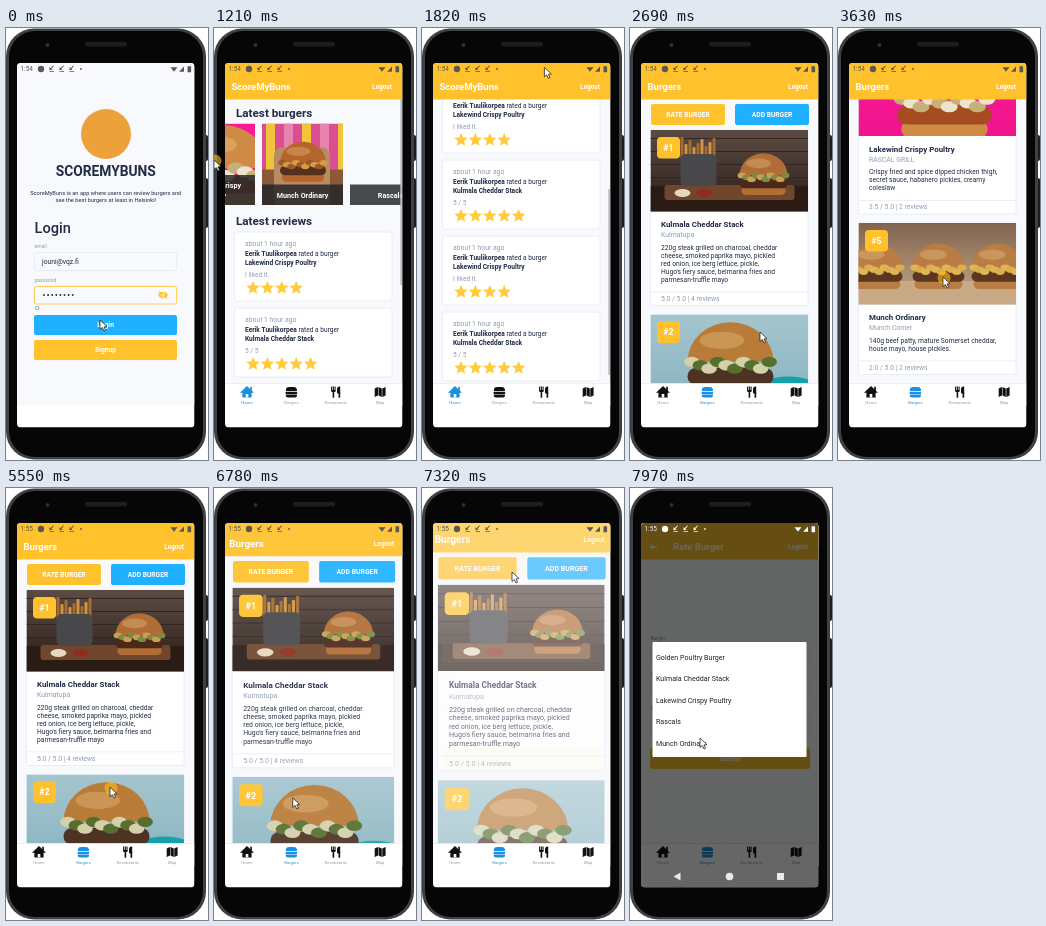
Recreate the animation shown at these times as an HTML page with a canvas. Size 202x432 px, loop 8 s.

```html
<!DOCTYPE html>
<html lang="en">
<head>
<meta charset="utf-8">
<title>Burger app demo</title>
<style>
html, body { margin: 0; width: 100%; height: 100%; overflow: hidden; background: #fff; }
canvas { display: block; width: 100vw; height: 100vh; }
</style>
</head>
<body>
<canvas id="stage"></canvas>
<script>
const W = 202, H = 432, LOOP = 8000;
const canvas = document.getElementById('stage');
const c = canvas.getContext('2d');

const YELLOW = '#ffc22d', BLUE = '#1fb1ff', ACTIVE = '#1a8fe3';
const INK = '#222b45', GRAY = '#8f9bb3', PAGE = '#f7f9fc', LINE = '#e4e9f2';
const APP = 'ScoreMyBuns';
const SCREEN = { x: 11, y: 35, w: 177.5, h: 364.5 };
const BODY = { ...SCREEN, h: 320.5 };
const MID = SCREEN.x + SCREEN.w / 2;
const PHOTO_W = 157.5, PHOTO_H = 81.5;

const burgers = [
  { name: 'Kulmala Cheddar Stack', place: 'Kulmatupa', score: '5.0 / 5.0 | 4 reviews', text: [
    '220g steak grilled on charcoal, cheddar', 'cheese, smoked paprika mayo, pickled',
    'red onion, ice berg lettuce, pickle,', 'Hugo\'s fiery sauce, belmarina fries and', 'parmesan-truffle mayo'] },
  { name: 'Rascals', place: 'RASCAL GRILL', score: '4.5 / 5.0 | 2 reviews', text: [
    '140g beef patty, cheddar cheese, creamy', 'coleslaw, iceberg lettuce, pickled red',
    'onion, house pickles, smoked paprika', 'mayo'] },
  { name: 'Golden Poultry Burger', place: 'Kulmatupa', score: '4.0 / 5.0 | 1 reviews', text: [
    'Crispy chicken breast, cheddar cheese,', 'smoked paprika mayo, Hugo\'s fiery sauce,',
    'pickled red onion, iceberg lettuce, pickle,', 'belmarina fries & parmesan-truffle mayo'] },
  { name: 'Lakewind Crispy Poultry', place: 'RASCAL GRILL', score: '3.5 / 5.0 | 2 reviews', text: [
    'Crispy fried and spice dipped chicken thigh,', 'secret sauce, habanero pickles, creamy', 'coleslaw'] },
  { name: 'Munch Ordinary', place: 'Munch Corner', score: '2.0 / 5.0 | 2 reviews', text: [
    '140g beef patty, mature Somerset cheddar,', 'house mayo, house pickles.'] }
];

// --- timing: every pointer move lasts STEP, drags also scroll ---
const STEP = 250, FADE = 240;
const LOADING = 390, LOADED = 550, TO_BURGERS = 2020, PICK = 7750;
const START = [94, 292], TAB = [76, 365];
const visits = [
  { from: 4180, to: 4690, draw: () => detail(2) },
  { from: 5780, to: 6605, draw: () => detail(0) },
  { from: 7180, to: LOOP * 2, draw: () => form() }
];
const moves = [];

function move(start, to, drag) {
  const from = moves.length ? moves[moves.length - 1].to : START;
  moves.push({ start, from, to, drag });
}
move(LOADED, [150, 132]);
move(960, [0, 132], 'slides');
move(1220, [130, 300]);
move(1500, [128, 0], 'home');
move(1770, TAB);
move(2440, [130, 304]);
move(2700, [122, 0], 'list');
move(3150, [105, 249]);
move(3640, [105, 150]);
move(3890, [108, 270], 'list');
move(4450, TAB);
move(4950, [100, 90]);
move(5310, [104, 300], 'list');
move(6150, TAB);
move(6710, [90, 84]);
move(7440, [75, 163]);
move(7720, [70, 250]);

const clamp = (v, lo = 0, hi = 1) => Math.max(lo, Math.min(hi, v));
const ramp = (t, start, span) => clamp((t - start) / span);
const ease = k => k * k * (3 - 2 * k);

function place(m, t) {
  const k = ease(ramp(t, m.start, STEP));
  return m.from.map((v, i) => v + (m.to[i] - v) * k);
}

function scrolled(kind, axis, t, gain = 1, max = 300) {
  return moves.filter(m => m.drag === kind)
    .reduce((v, m) => clamp(v + (m.from[axis] - place(m, t)[axis]) * gain, 0, max), 0);
}

// The finger is down while dragging and just before it leaves a spot.
function isPressed(t) {
  return moves.some((m, i) => m.drag
    ? t >= m.start && t <= m.start + STEP
    : i > 0 && t >= m.start - 80 && t < m.start);
}

// --- drawing helpers ---
function rect(x, y, w, h, fill, r = 0, stroke) {
  c.beginPath();
  c.roundRect(x, y, w, h, r);
  if (fill) { c.fillStyle = fill; c.fill(); }
  if (stroke) { c.strokeStyle = stroke; c.lineWidth = 0.8; c.stroke(); }
}

const area = (a, fill) => rect(a.x, a.y, a.w, a.h, fill);

function text(s, x, y, size, color = INK, weight = 400, align = 'left') {
  c.font = `${weight} ${size}px Roboto, sans-serif`;
  c.textAlign = align;
  c.textBaseline = 'middle';
  c.fillStyle = color;
  c.fillText(s, x, y + size * 0.06);
  return c.measureText(s).width;
}

function oval(x, y, rx, ry, fill, from = 0, to = Math.PI * 2) {
  c.beginPath();
  c.ellipse(x, y, rx, ry, 0, from, to);
  c.fillStyle = fill;
  c.fill();
}

function poly(points, fill, stroke, width = 1) {
  c.beginPath();
  points.forEach(p => c.lineTo(p[0], p[1]));
  c.closePath();
  if (fill) { c.fillStyle = fill; c.fill(); }
  if (stroke) { c.strokeStyle = stroke; c.lineWidth = width; c.stroke(); }
}

function repeat(n, draw) {
  for (let i = 0; i < n; i++) draw(i);
}

function clip(a, draw, r = 0) {
  c.save();
  c.beginPath();
  c.roundRect(a.x, a.y, a.w, a.h, r);
  c.clip();
  draw();
  c.restore();
}

function star(x, y, r) {
  const pts = Array.from({ length: 10 }, (_, i) => {
    const a = (i / 5 - 0.5) * Math.PI, q = i % 2 ? r * 0.45 : r;
    return [x + q * Math.cos(a), y + q * Math.sin(a)];
  });
  poly(pts, '#ffcb3d');
}

// --- photos, simplified to flat shapes ---
function backdrop(top, bottom) {
  const g = c.createLinearGradient(0, 0, 0, PHOTO_H);
  g.addColorStop(0, top);
  g.addColorStop(1, bottom);
  rect(0, 0, PHOTO_W, PHOTO_H, g);
}

function bun(x, y, w, top, leaf, sauce, meat) {
  const u = w / 10;
  rect(x - 4.6 * u, y + 2.8 * u, 9.2 * u, 1.8 * u, top, u);
  rect(x - 5 * u, y + 1.2 * u, 10 * u, 2 * u, meat, u);
  oval(x, y + 0.5 * u, 5 * u, 4.6 * u, top, Math.PI, 0);
  oval(x - u, y - 2 * u, 2.6 * u, u, 'rgba(255,225,170,.25)');
  repeat(10, i => oval(x + (i - 4.5) * u, y + (0.5 + i % 3 * 0.4) * u, 0.9 * u, 0.6 * u, i % 2 ? leaf : sauce));
}

const photos = [
  () => {
    backdrop('#5b4b43', '#2a1d17');
    repeat(4, i => rect(0, 8 + i * 13, PHOTO_W, 1, '#302520'));
    rect(0, 56, PHOTO_W, 26, '#2a1b14');
    rect(14, 55, 130, 15, '#70472c', 3);
    repeat(9, i => rect(30 + i * 4, 7 + i * 7 % 11, 3, 22, i % 2 ? '#cf9547' : '#a66c30', 1));
    rect(30, 24, 36, 32, '#48484a', 5);
    repeat(2, i => oval(32 + i * 22, 63, 8, 4, i ? '#8e2c1d' : '#e5d8c2'));
    bun(113, 43, 48, '#b06d35', '#7d8a45', '#c9a052', '#4a291a');
  },
  () => {
    backdrop('#a5c5ce', '#8ab5c1');
    oval(138, 78, 34, 16, '#16a0ac');
    bun(80, 43, 86, '#b97b38', '#566f2f', '#d3d0aa', '#4c3323');
  },
  () => {
    backdrop('#5a5f62', '#858988');
    rect(0, 62, PHOTO_W, 20, '#4e392d');
    oval(142, 18, 40, 10, '#d0a48a');
    rect(14, 59, 112, 13, '#946642', 2);
    bun(64, 42, 46, '#a55f2b', '#9b733c', '#d2b078', '#7d4322');
  },
  () => {
    backdrop('#fa1a96', '#f0148c');
    bun(86, 40, 94, '#cf8b45', '#eee3cc', '#c5b078', '#a54d20');
  },
  () => {
    backdrop('#806450', '#c9aa86');
    rect(0, 58, PHOTO_W, 24, '#c7a985');
    [18, 139, 80].forEach(x => bun(x, 42, 52, '#b97c42', '#dcae4c', '#e0b552', '#5b3620'));
  }
];

function photo(k, x, y, w) {
  clip({ x, y, w, h: PHOTO_H }, () => {
    c.translate(x - (PHOTO_W - w) / 2, y);
    photos[k]();
  });
}

function stripedPhoto(x, y) {
  clip({ x, y, w: 81, h: PHOTO_H }, () => {
    c.translate(x, y);
    rect(0, 0, 81, PHOTO_H, '#d94f91');
    repeat(5, i => rect(4 + i * 18, 0, 9, 48, i % 2 ? '#e783ae' : '#f2c43b'));
    rect(0, 46, 81, 36, '#8a5937');
    rect(12, 24, 56, 60, '#b88b62', 8);
    bun(41, 37, 46, '#b5652b', '#d79b44', '#9a5b2c', '#56301d');
  });
}

// --- shared parts ---
function header(title, back) {
  rect(SCREEN.x, 35, SCREEN.w, 36.5, YELLOW);
  if (back) {
    poly([[20, 59], [27, 59]], null, '#fff');
    [-3, 3].forEach(d => poly([[20, 59], [23, 59 + d]], null, '#fff'));
  }
  text(title, back ? 43 : 17.5, 59, 9.5, '#fff', 700);
  text('Logout', 178, 59, 6.3, '#fff', 700, 'right');
}

function button(label, x, y, w, h, color) {
  rect(x, y, w, h, color, 2);
  text(label, x + w / 2, y + h / 2, 6.7, '#fff', 700, 'center');
}

function field(label, y, h = 18, x = 28, w = 143, stroke = LINE) {
  text(label, x + 0.5, y - 6, 5, GRAY);
  rect(x + 0.4, y, w - 0.8, h, PAGE, 2, stroke);
}

function login(t) {
  area({ ...SCREEN, h: 342 }, PAGE);
  oval(100, 106, 25, 25, '#eda13a');
  text(APP.toUpperCase(), MID, 143, 13.8, INK, 700, 'center');
  text(APP + ' is an app where users can review burgers and', MID, 165, 5.7, INK, 400, 'center');
  text('see the best burgers at least in Helsinki!', MID, 172, 5.7, INK, 400, 'center');
  text('Login', 28.5, 200, 14.6, INK, 500);
  field('email', 224.5);
  text('jouni@vqz.fi', 36, 233.5, 6.8);
  field('password', 258.5, 17.5, 28, 143, YELLOW);
  repeat(8, i => oval(38 + i * 4.1, 267, 0.95, 0.95, INK));
  oval(157, 267, 4.6, 3, YELLOW);
  oval(157, 267, 1.8, 1.8, PAGE);
  poly([[153, 263], [161, 271]], null, YELLOW);
  rect(29.2, 278.2, 3.6, 3.6, null, 1.8, GRAY);
  c.globalAlpha = 1 - 0.4 * (ramp(t, 140, 40) - ramp(t, 200, 40));
  button('Login', 28, 287, 143, 20, BLUE);
  c.globalAlpha = 1;
  button('Signup', 28, 312, 143, 20, YELLOW);
}

// --- home ---
function slide(k, x) {
  if (k === 4) stripedPhoto(x, 95.5);
  else if (k !== 1) photo(k, x, 95.5, 81);
  const words = burgers[k].name.split(' ');
  const lines = words.length > 2 ? [words.slice(0, 2).join(' '), words[2]] : [words.join(' ')];
  const h = 11 + lines.length * 9.5;
  rect(x, 177 - h, 81, h, 'rgba(32,36,42,.82)');
  lines.forEach((s, i) => text(s, x + 40.5, 167 - (lines.length - 1 - i) * 9.5, 7.2, '#fff', 700, 'center'));
}

function review(y, name, note, stars) {
  rect(20.5, y, PHOTO_W, 69, '#fff', 2, LINE);
  text('about 1 hour ago', 31, y + 12, 6.8, GRAY);
  const w = text('Eerik Tuulikorpea', 31, y + 21.8, 6.6, INK, 700);
  text(' rated a burger', 31 + w, y + 21.8, 6.6);
  text(name, 31, y + 31, 6.6, INK, 700);
  text(note, 31, y + 42.5, 6.6, GRAY);
  repeat(stars, i => star(39 + i * 14.4, y + 56, 7.2));
}

function home(t) {
  area(BODY, PAGE);
  const top = scrolled('home', 1, t);
  c.save();
  c.translate(0, -top);
  text('Latest burgers', 22, 85, 11.7, INK, 700);
  text('Latest reviews', 22, 193, 11.7, INK, 700);
  if (t >= LOADED) {
    const left = 22 - scrolled('slides', 0, t);
    [0, 3, 4, 1, 2].forEach((k, i) => slide(k, left + i * 88));
    repeat(8, i => {
      if (i % 2) review(204 + i * 76, burgers[0].name, '5 / 5', 5);
      else review(204 + i * 76, burgers[3].name, 'I liked it.', 4);
    });
  }
  c.restore();
  if (t >= LOADED) rect(186.3, 71 + top * 0.3, 1.8, 186, '#b9bdc5');
  header(APP);
}

// --- burgers ---
function card(k, y) {
  const b = burgers[k], p = y + PHOTO_H, end = p + 8 * b.text.length;
  rect(20.5, y, PHOTO_W, end + 54 - y, '#fff', 2, LINE);
  photo(k, 20.5, y, PHOTO_W);
  rect(27, y + 7, 23, 21.5, YELLOW, 4);
  text('#' + (k + 1), 38.5, y + 17.8, 8.8, '#fff', 700, 'center');
  text(b.name, 31, p + 13, 7.9, INK, 700);
  text(b.place, 31, p + 23.5, 6.9, GRAY);
  b.text.forEach((s, i) => text(s, 31, p + 36 + i * 8, 6.7));
  rect(20.5, end + 40, PHOTO_W, 0.7, LINE);
  text(b.score, 31, end + 47, 6.8, GRAY);
}

function list(t) {
  area(BODY, PAGE);
  let y = 102 - scrolled('list', 1, t, 2.02, 613);
  button('RATE BURGER', 21, y - 26, 74, 21, YELLOW);
  button('ADD BURGER', 105, y - 26, 74, 21, BLUE);
  burgers.forEach((b, k) => {
    if (y > -130 && y < 360) card(k, y);
    y += 144.5 + 8 * b.text.length;
  });
  header('Burgers');
}

function detail(k) {
  card(k, 82);
  header('Burgers', true);
}

function form() {
  field('Burger', 156, 18, 20, 160);
  field('Rating', 192, 18, 20, 160);
  field('Review', 226, 24, 20, 160);
  button('Submit', 20, 260, 160, 21, YELLOW);
  header('Rate Burger', true);
}

// The page below grows while the opened page fades in over it.
function burgersTab(t) {
  const visit = visits.find(v => t > v.from && t < v.to + FADE);
  const p = visit ? ramp(t, visit.from, FADE) - ramp(t, visit.to, FADE) : 0;
  c.save();
  c.translate(MID, 190);
  c.scale(1 + 0.1 * p, 1 + 0.1 * p);
  c.translate(-MID, -190);
  list(t);
  c.restore();
  if (!p) return;
  c.globalAlpha = p ** 2;
  area(BODY, '#f9fafc');
  c.globalAlpha = p ** 6;
  visit.draw();
  c.globalAlpha = 1;
}

// --- tab bar, status bar, phone ---
const tabs = {
  Home: col => {
    poly([[-7, 0.8], [0, -6], [7, 0.8]], col);
    rect(-4.6, 0, 9.2, 5.5, col);
    rect(-1.3, 2, 2.6, 3.5, '#fff');
    rect(3.2, -5.3, 1.7, 4, col);
  },
  Burgers: col => {
    rect(-5.6, -5, 11.2, 4.2, col, [4.5, 4.5, 1, 1]);
    rect(-6, -0.1, 12, 2, col, 1);
    rect(-5.6, 2.6, 11.2, 2.9, col, [0.5, 0.5, 2, 2]);
  },
  Restaurants: col => {
    repeat(3, i => rect(-4.7 + i * 1.7, -5.5, 1.1, 4.5, col));
    rect(-4.7, -2, 4.5, 2, col, 1);
    rect(-3.2, -1, 1.6, 6.8, col, 0.6);
    rect(1.2, -5.5, 3.2, 7, col, [2.5, 0.5, 0, 1]);
    rect(2.7, 0, 1.7, 5.8, col, 0.6);
  },
  Map: col => repeat(3, i => {
    const x = -5.5 + i * 3.8, d = i % 2 ? -0.8 : 0.8;
    poly([[x, d - 4.2], [x + 3.3, -d - 4.2], [x + 3.3, 4.2 - d], [x, 4.2 + d]], col);
  })
};

function tabBar(active, loaded) {
  rect(SCREEN.x, 355.5, SCREEN.w, 22.5, '#fff');
  rect(SCREEN.x, 355, SCREEN.w, 0.7, '#e6eaf1');
  if (!loaded) return;
  Object.entries(tabs).forEach(([name, icon], i) => {
    const x = 33 + i * 44.4;
    c.save();
    c.translate(x, 364);
    icon(name === active ? ACTIVE : '#111');
    c.restore();
    text(name, x, 374.8, 4.2, name === active ? ACTIVE : GRAY, 400, 'center');
  });
}

function statusBar(t, col) {
  text(t < 5310 ? '1:54' : '1:55', 14.5, 41, 6.4, col);
  oval(35, 41, 3.2, 3.2, col);
  repeat(3, i => {
    const x = 45.5 + i * 10;
    poly([[x + 2, 38], [x - 1.6, 41.5]], null, col, 0.9);
    poly([[x - 2, 39], [x - 2, 42], [x + 1, 42]], col);
    rect(x - 2, 43.2, 4.5, 0.9, col);
  });
  oval(75, 41, 0.9, 0.9, col);
  poly([[164.5, 39.2], [171.5, 39.2], [168, 43.8]], col);
  poly([[173, 43.8], [178, 43.8], [178, 38.4]], col);
  rect(181.5, 38.2, 3.6, 6, col, 0.5);
}

function picker(alpha) {
  c.globalAlpha = alpha;
  area(SCREEN, 'rgba(0,0,0,.6)');
  rect(22.5, 154, 154, 115, '#fff', 1);
  [2, 0, 3, 1, 4].forEach((k, i) => text(burgers[k].name, 26, 169 + i * 21.6, 7.1, '#222'));
  poly([[43.5, 388.5], [50.5, 384.5], [50.5, 392.5]], '#e9e9e9');
  oval(99.5, 388.5, 3.8, 3.8, '#e9e9e9');
  rect(147, 385, 7, 7, '#e9e9e9');
  statusBar(PICK, '#fff');
  c.globalAlpha = 1;
}

function phone() {
  rect(194, 107, 8, 26, '#1c1d1f', 2);
  rect(194, 150, 8, 50, '#1c1d1f', 2);
  rect(0, 0.5, 200, 431, '#3d4045', 28);
  rect(3, 3, 194, 426, '#060607', 26);
  oval(41.5, 17, 2, 2, '#2b2e33');
  rect(79, 14, 42, 4.5, '#1d1e21', 2);
}

function cursor(t) {
  const last = moves.filter(m => t >= m.start).pop();
  const [x, y] = last ? place(last, t) : START;
  if (isPressed(t)) oval(x + 1, y + 1, 6.5, 6.5, 'rgba(255,190,30,.6)');
  c.save();
  c.translate(x, y);
  poly([[0, 0], [0, 9.5], [2.3, 7.5], [4, 11], [5.6, 10.2], [4, 6.9], [7, 6.6]], '#fff', '#111', 0.7);
  c.restore();
}

function draw(t) {
  rect(0, 0, W, H, '#fff');
  phone();
  clip(SCREEN, () => {
    area(SCREEN, '#fff');
    if (t < LOADING) {
      login(t);
    } else {
      const onHome = t < TO_BURGERS;
      clip(BODY, () => onHome ? home(t) : burgersTab(t));
      tabBar(onHome ? 'Home' : 'Burgers', t >= LOADED);
    }
    statusBar(t, '#5c5850');
    if (t >= PICK) picker(ramp(t, PICK, 200));
  }, 4);
  cursor(t);
}

function frame(now) {
  const ratio = window.devicePixelRatio || 1;
  const w = Math.round(innerWidth * ratio), h = Math.round(innerHeight * ratio);
  if (canvas.width !== w || canvas.height !== h) {
    canvas.width = w;
    canvas.height = h;
  }
  c.setTransform(w / W, 0, 0, h / H, 0, 0);
  draw(now % LOOP);
  requestAnimationFrame(frame);
}
requestAnimationFrame(frame);
</script>
</body>
</html>
```
